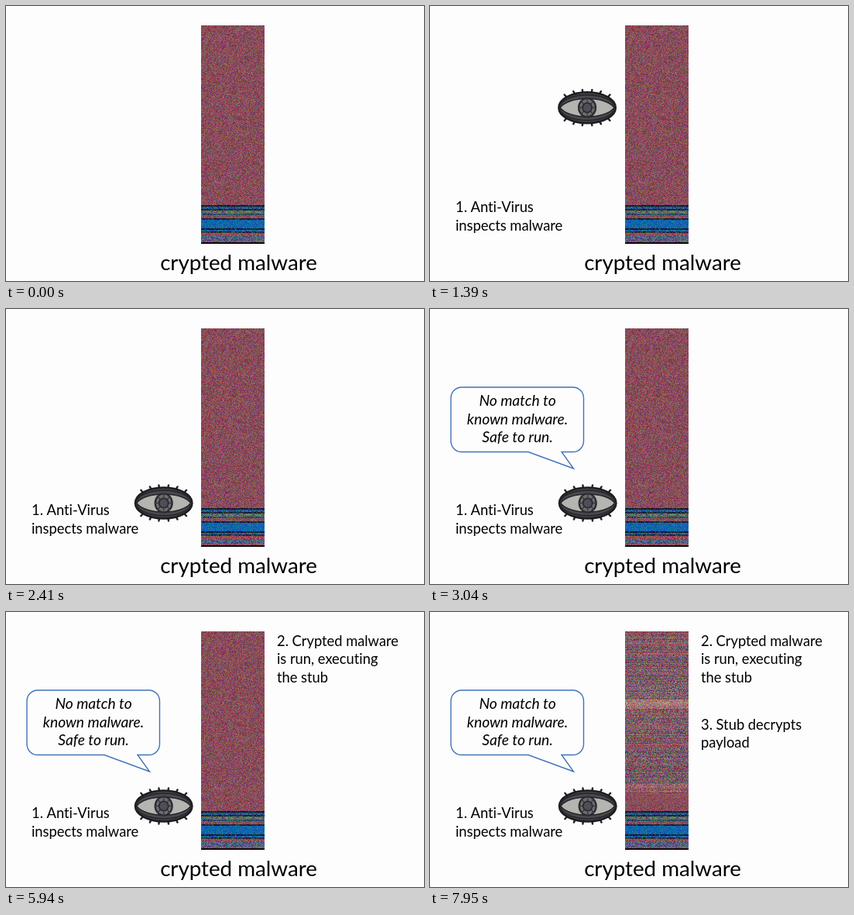
These frames come from a looping animation (540 px wide and 355 px high, 7.99 s). An HTML page with a canvas:

```html
<!DOCTYPE html>
<html lang="en">
<head>
<meta charset="utf-8">
<title>Crypted malware</title>
<style>
  html, body { margin: 0; width: 100%; height: 100%; overflow: hidden; background: #fdfdfe; }
  canvas { display: block; }
</style>
</head>
<body>
<canvas id="stage" width="540" height="355"></canvas>
<script>
const ctx = document.getElementById('stage').getContext('2d');
const LOOP = 7990;
const BAR = { x: 252, y: 25, w: 82, h: 282, stub: 232 };

const clamp = v => Math.max(0, Math.min(1, v));
const ramp = (t, a, b) => clamp((t - a) / (b - a));
const easeInOut = u => u < 0.5 ? 2 * u * u : 1 - 2 * (1 - u) * (1 - u);

function random(seed) {
  return () => {
    seed = (seed + 0x6d2b79f5) | 0;
    let n = Math.imul(seed ^ (seed >>> 15), 1 | seed);
    n = (n + Math.imul(n ^ (n >>> 7), 61 | n)) ^ n;
    return ((n ^ (n >>> 14)) >>> 0) / 4294967296;
  };
}

// Stub bands: first row below the bar top, colour, grain
const stubBands = [
  [232, 0x14202e, 34], [234, 0x1c588c, 50], [237, 0x1c2c3c, 44],
  [239, 0x5c6c60, 56], [243, 0x2c5068, 50], [245, 0x84505a, 45],
  [249, 0x182c3c, 44], [251, 0x1066a8, 30], [262, 0x122434, 56],
  [264, 0x1f609a, 42], [266, 0x283440, 50], [268, 0x984a54, 42],
  [272, 0x4c6080, 52], [278, 0x88505e, 46], [280, 0x08080a, 6]
];

function bandAt(bands, y) {
  let found = bands[0];
  for (const b of bands) if (y >= b[0]) found = b;
  return found;
}

// Each row gives [colour, grain, brightness shift]
function cryptedRow(y) {
  if (y < BAR.stub) return [0x884c5a, 38, 0];
  const [, color, grain] = bandAt(stubBands, y);
  return [color, grain, 0];
}

function payloadRow(y, rnd) {
  const shift = (rnd() - 0.5) * 24, streak = rnd();
  if (y >= 88 && y < 100) return [0xa87c78, 50, shift];
  if (y >= 208) return [streak < 0.25 ? 0x7c5660 : 0x8c4e5a, 40, shift];
  if (y >= 197) return [0x98626a, 48, shift];
  if (streak < (y < 40 ? 0.35 : 0.2)) return [0x94525e, 40, shift];
  return [0x785c66, 54, shift];
}

function makeBar(rowStyle, seed) {
  const cv = document.createElement('canvas');
  cv.width = BAR.w;
  cv.height = BAR.h;
  const c = cv.getContext('2d');
  const img = c.createImageData(BAR.w, BAR.h);
  const rnd = random(seed);
  let i = 0;
  for (let y = 0; y < BAR.h; y++) {
    const [color, grain, shift] = rowStyle(y, rnd);
    for (let x = 0; x < BAR.w; x++) {
      for (const bits of [16, 8, 0]) {
        img.data[i++] = ((color >> bits) & 255) + shift + (rnd() * 2 - 1) * grain;
      }
      img.data[i++] = 255;
    }
  }
  c.putImageData(img, 0, 0);
  return cv;
}

const crypted = makeBar(cryptedRow, 11);
const payload = makeBar(payloadRow, 29);

function drawBar(t) {
  ctx.drawImage(crypted, BAR.x, BAR.y);
  // Soft-edged wipe from the top
  const edge = (t - 6600) * 0.16, soft = 24;
  for (let y = 0; y < BAR.stub; y++) {
    const a = t < 6500 ? 0 : clamp((edge - y) / soft + 0.5);
    if (!a) break;
    ctx.globalAlpha = a;
    ctx.drawImage(payload, 0, y, BAR.w, 1, BAR.x, BAR.y + y, BAR.w, 1);
  }
  ctx.globalAlpha = 1;
}

function text(lines, x, y, font, align = 'left', step = 23.5) {
  ctx.font = font + ' Lato, "Open Sans", sans-serif';
  ctx.letterSpacing = '-0.04px'; // also switches ligatures off
  ctx.textAlign = align;
  ctx.fillStyle = '#000';
  lines.forEach((s, i) => ctx.fillText(s, x, Math.round(y + i * step)));
}

const note = (lines, x, y) => text(lines, x, y, '18.4px');

function faded(alpha, draw) {
  if (alpha <= 0) return;
  ctx.save();
  ctx.globalAlpha = alpha;
  draw();
  ctx.restore();
}

function ellipse(rx, ry, fill, stroke, width = 1) {
  ctx.beginPath();
  ctx.ellipse(0, 0, rx, ry, 0, 0, Math.PI * 2);
  if (fill) {
    ctx.fillStyle = fill;
    ctx.fill();
  }
  if (stroke) {
    ctx.strokeStyle = stroke;
    ctx.lineWidth = width;
    ctx.stroke();
  }
}

function line(x1, y1, x2, y2) {
  ctx.beginPath();
  ctx.moveTo(x1, y1);
  ctx.lineTo(x2, y2);
  ctx.stroke();
}

function drawEye(x, y) {
  ctx.save();
  ctx.translate(x, y);
  ctx.lineCap = 'round';
  ctx.strokeStyle = '#202024';
  ctx.lineWidth = 2.4;
  for (const dx of [-28, -17, -6, 6, 17, 28]) {
    const h = 20 * Math.sqrt(1 - (dx / 38) ** 2);
    for (const side of [-1, 1]) line(dx * 0.95, side * h, dx * 1.05, side * (h + 3.2));
  }
  ellipse(36.7, 20, '#4a4a4e', '#1c1c20', 2.6);
  ellipse(35.5, 16.5, null, '#29292d', 2);
  // Almond-shaped white
  ctx.beginPath();
  ctx.moveTo(-35, 0);
  ctx.bezierCurveTo(-24, -15.5, 24, -15.5, 35, 0);
  ctx.bezierCurveTo(24, 15.5, -24, 15.5, -35, 0);
  ctx.fillStyle = '#b4b4b0';
  ctx.fill();
  ctx.strokeStyle = '#252529';
  ctx.lineWidth = 1.5;
  ctx.stroke();
  // Iris and pupil
  ellipse(11, 12, '#6c6c70', '#29292d', 2.2);
  ctx.strokeStyle = '#38383c';
  ctx.lineWidth = 1.3;
  for (let i = 0; i < 8; i++) {
    const a = i * Math.PI / 4;
    line(6 * Math.cos(a), 6 * Math.sin(a), 11 * Math.cos(a), 12 * Math.sin(a));
  }
  ellipse(6, 6.2, '#4c4e58', '#29292d', 1.6);
  ctx.restore();
}

function drawBubble() {
  const l = 27, t = 101, r = 198.5, b = 184.5, k = 14;
  ctx.beginPath();
  ctx.moveTo(l + k, t);
  ctx.arcTo(r, t, r, b, k);
  ctx.arcTo(r, b, l, b, k);
  ctx.lineTo(170, b);
  ctx.lineTo(185.5, 206);
  ctx.lineTo(127, b);
  ctx.arcTo(l, b, l, t, k);
  ctx.arcTo(l, t, r, t, k);
  ctx.closePath();
  ctx.fillStyle = '#fdfdfe';
  ctx.fill();
  ctx.strokeStyle = '#4173b8';
  ctx.lineWidth = 1.4;
  ctx.stroke();
  text(['No match to', 'known malware.', 'Safe to run.'], 113, 125, 'italic 19.3px', 'center');
}

function render(t) {
  ctx.fillStyle = '#fdfdfe';
  ctx.fillRect(0, 0, 540, 355);
  drawBar(t);
  text(['crypted malware'], 300.5, 340.5, '27.8px', 'center');

  const intro = ramp(t, 0, 530);
  const move = easeInOut(ramp(t, 614, 2388));
  faded(intro, () => note(['1. Anti-Virus', 'inspects malware'], 33, 266));
  faded(intro, () => drawEye(202.7 + move, 57 + 193.5 * move));
  faded(ramp(t, 2510, 3040), drawBubble);
  faded(ramp(t, 4490, 5050), () =>
    note(['2. Crypted malware', 'is run, executing', 'the stub'], 350, 43.5));
  faded(ramp(t, 5940, 6480), () =>
    note(['3. Stub decrypts', 'payload'], 350, 151.5));
}

const start = performance.now();
function tick() {
  render((performance.now() - start) % LOOP);
  requestAnimationFrame(tick);
}
tick();
</script>
</body>
</html>
```
